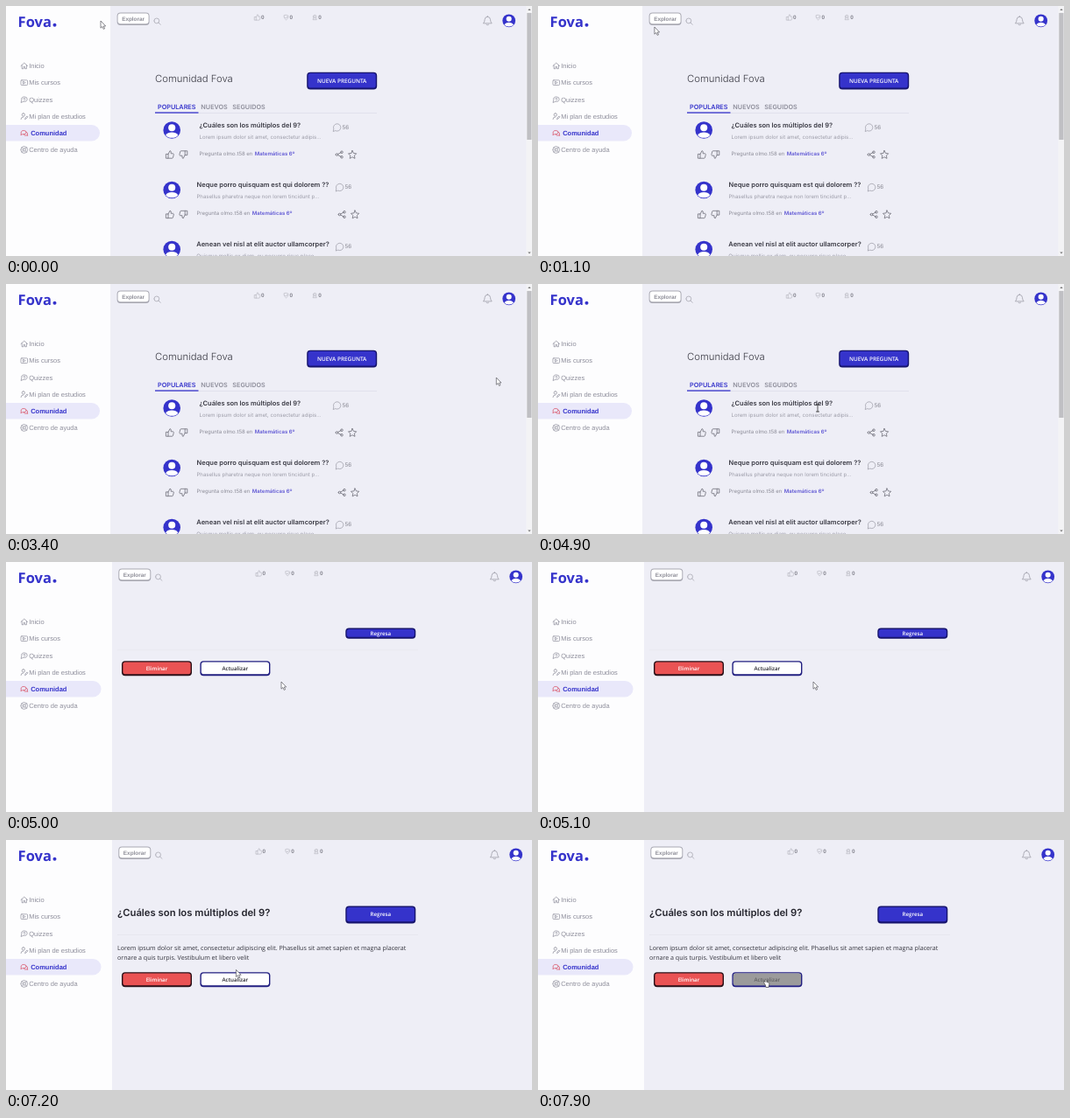
Animation of 600 by 286 pixels, one loop 8000 ms. Source, as an HTML page:

```html
<!DOCTYPE html>
<html lang="es">
<head>
<meta charset="utf-8">
<title>Comunidad</title>
<style>
  html, body { margin: 0; width: 100%; height: 100%; overflow: hidden; background: #eeeef6; }
  svg { display: block; width: 100vw; height: 100vh; }
  text { font-family: "Liberation Sans", Arial, sans-serif; white-space: pre; text-rendering: geometricPrecision; }
  .open { font-family: "Open Sans", sans-serif; }
  .inter { font-family: Inter, sans-serif; }
  .b { font-weight: 700; }
  .semi { font-weight: 600; }
  .light { font-weight: 300; }
  .line { fill: none; stroke-width: .75; stroke-linecap: round; stroke-linejoin: round; }
</style>
</head>
<body>
<svg id="stage" viewBox="0 0 600 286" xmlns="http://www.w3.org/2000/svg"></svg>
<script>
const BLUE = '#3533cb', NAVY = '#17156e', GREY = '#8e8e9b', INK = '#3a3a44';
const LOOP = 8000, STEP = 100, OPEN_AT = 5000, LOADED_AT = 5300, HOVER_AT = 7500;

// Outlines centred on 0,0
const ICONS = {
  home: 'M-4 0L0-3.6 4 0M-2.8-.8V3.4H-.8V1H.8V3.4H2.8V-.8',
  video: 'M-3-3H3Q4-3 4-2V2Q4 3 3 3H-3Q-4 3-4 2V-2Q-4-3-3-3ZM-1-1.4L1.5 0-1 1.4Z',
  quiz: 'M-3.8 3.4L-3.2.8Q-4-3 .3-3.2 4-3 3.6.3 3 3.2-.6 2.6ZM-1.2-1Q1.6-2.4 1.2-.2L0 .8',
  plan: 'M-1-3.6A1.8 1.8 0 1 1-1 0 1.8 1.8 0 1 1-1-3.6M-4 3.6Q-4 .8-1 .8M1 3.4L1.4 1.8 3.4-.2 4.4.8 2.4 2.8Z',
  chat: 'M-3.8 1.2Q-4.6-3-.6-3 2.6-3 2.4-.4 2 1.8-1.4 1.4L-3.8 2.2ZM2.6-1.2Q4.6-.4 3.8 1.8L4.2 3.2 2.4 2.8Q.4 3.6-.6 2',
  help: 'M-4 0A4 4 0 1 1 4 0 4 4 0 1 1-4 0M-1.7 0A1.7 1.7 0 1 1 1.7 0 1.7 1.7 0 1 1-1.7 0M-2.8-2.8L-1.2-1.2M2.8-2.8L1.2-1.2M-2.8 2.8L-1.2 1.2M2.8 2.8L1.2 1.2',
  search: 'M-3.8-.6A3.1 3.1 0 1 1 2.4-.6 3.1 3.1 0 1 1-3.8-.6M1.6 1.7L4 4',
  bell: 'M-4.6 2.6Q-3.2 1.4-3.2-1.6-3-4.6 0-4.6 3-4.6 3.2-1.6 3.2 1.4 4.6 2.6ZM0-4.6V-5.6M-1.4 4.2Q0 5.6 1.4 4.2',
  thumb: 'M-4.2-.6H-2V4.2H-4.2ZM-2-.4L0-4.4Q1.8-4.4 1.2-1.2H3.6Q4.6-1 4.2.6L3.4 3.6Q3.2 4.2 2.4 4.2H-2',
  shield: 'M0-3.6L3.4-2.4Q3.6 2 0 3.8-3.6 2-3.4-2.4ZM-1.4 0L-.2 1.2 1.6-1',
  medal: 'M-2.4-1.2A2.4 2.4 0 1 1 2.4-1.2 2.4 2.4 0 1 1-2.4-1.2M-2 1L-2.8 3.6H2.8L2 1M-1-1.2H1',
  bubble: 'M-4.4 4.4L-3.9 1.6A4.4 4.4 0 1 1-1.6 4Z',
  share: 'M-4.2 0A1.3 1.3 0 1 1-1.6 0 1.3 1.3 0 1 1-4.2 0M1.4-2.8A1.3 1.3 0 1 1 4-2.8 1.3 1.3 0 1 1 1.4-2.8M1.4 2.8A1.3 1.3 0 1 1 4 2.8 1.3 1.3 0 1 1 1.4 2.8M-1.7-.6L1.6-2.2M-1.7.6L1.6 2.2',
  star: 'M0-4.6L1.4-1.6 4.6-1.2 2.3 1.1 2.9 4.4 0 2.8-2.9 4.4-2.3 1.1-4.6-1.2-1.4-1.6Z'
};

const icon = (name, x, y, color = GREY, scale = 1, turn = 0) =>
  `<path class="line" d="${ICONS[name]}" stroke="${color}" transform="translate(${x} ${y}) rotate(${turn}) scale(${scale})"/>`;
const text = (x, y, size, fill, str, cls = '', anchor = 'start') =>
  `<text x="${x}" y="${y}" font-size="${size}" fill="${fill}" class="${cls}" text-anchor="${anchor}">${str}</text>`;
const rect = (x, y, w, h, fill, r = 0, extra = '') =>
  `<rect x="${x}" y="${y}" width="${w}" height="${h}" rx="${r}" fill="${fill}" ${extra}/>`;
const group = (id, body) => `<g id="${id}">${body}</g>`;

const button = (x, y, h, label, fill, edge, ink, size = 6.2) =>
  rect(x, y, 80, h, edge, 4) + rect(x + 1.4, y + 1.3, 77.2, h - 3.4, fill, 2.8) +
  text(x + 40, y + h / 2 + 1.9, size, ink, label, 'open semi', 'middle');

const avatar = (x, y, r) => `<g transform="translate(${x} ${y}) scale(${r / 10})">
  <circle r="10" fill="${BLUE}"/><circle cy="-2.8" r="4.1" fill="#fff"/>
  <path d="M-7.2 6Q-5 2.6 0 2.6T7.2 6Q4.6 9 0 9T-7.2 6Z" fill="#fff"/></g>`;

function frame(dx, side, pill, bell, user) {
  const nav = [['home', 'Inicio'], ['video', 'Mis cursos'], ['quiz', 'Quizzes'],
    ['plan', 'Mi plan de estudios'], ['chat', 'Comunidad'], ['help', 'Centro de ayuda']];
  const items = nav.map(([name, label], i) => {
    const y = 68.5 + i * 19.2, on = name === 'chat';
    return icon(name, 20.8, y, on ? '#d8485c' : GREY, .95) +
      text(on ? 28.2 : 26.2, y + 2.6, 7.5, on ? BLUE : GREY, label, on ? 'b' : '');
  }).join('');
  const stats = ['thumb', 'shield', 'medal'].map((name, i) => {
    const x = 286.8 + dx + i * 32.7;
    return icon(name, x, 13, '#adadb7', .75) + text(x + 4.1, 15.3, 6.4, '#85858f', '0', 'b');
  }).join('');
  return rect(0, 0, 600, 286, '#eeeef6') + rect(0, 0, side, 286, '#fdfdfe') +
    text(13.6, 23.8, 16.5, BLUE, 'Fova', 'open b') + `<circle cx="55.5" cy="21.8" r="2" fill="${BLUE}"/>` +
    rect(-12, 136, pill + 12, 18.5, '#e9e8fa', 9.2) + items +
    rect(126.6 + dx, 7.6, 37, 14.4, '#aaaab4', 4) + rect(127.6 + dx, 8.5, 35, 11.7, '#fff', 3) +
    text(145.1 + dx, 16.8, 6.4, '#8e8e98', 'Explorar', 'b', 'middle') +
    icon('search', 172.5 + dx, 17.5, '#a2a2ad', .95) + stats +
    icon('bell', bell, 17, '#9a9aa5') + avatar(user, 16.8, 7.4);
}

const POSTS = [
  { y: 136, x: 220.5, cx: 377.5, title: '¿Cuáles son los múltiplos del 9?', body: 'Lorem ipsum dolor sit amet, consectetur adipis...' },
  { y: 204.5, x: 217.5, cx: 380.5, title: 'Neque porro quisquam est qui dolorem ??', body: 'Phasellus pharetra neque non lorem tincidunt p...' },
  { y: 272.5, x: 217.3, cx: 380.5, title: 'Aenean vel nisl at elit auctor ullamcorper?', body: 'Quisque mollis ex diam, eu posuere risus place' }
];

const post = ({ y, x, cx, title, body }) =>
  avatar(189.2, y + 6, 9.8) + text(x, y + 2.8, 7.5, INK, title, 'inter semi') +
  text(x, y + 15.5, 6.05, '#9c9ca8', body, 'inter') +
  icon('bubble', cx, y + 3, '#9a9aa5', .95) + text(cx + 6, y + 4.6, 6.4, '#85858f', '56', 'inter') +
  icon('thumb', 187, y + 34, '#666671') + icon('thumb', 202.2, y + 34, '#666671', 1, 180) +
  text(x, y + 34.9, 6, '#8a8a96', 'Pregunta olmo.t58 en', 'inter') +
  text(x + 63.3, y + 34.9, 6, '#5f57d4', 'Matemáticas 6º', 'inter semi') +
  icon('share', cx + 2.8, y + 34, '#666671') + icon('star', cx + 17.6, y + 34, '#666671');

const tab = (x, label, color) => text(x, 117.7, 7.25, color, label, 'inter semi');

const listPage = frame(0, 119, 107, 549.3, 573.7) +
  text(170, 87.2, 11.3, INK, 'Comunidad Fova', 'inter light') +
  button(343.2, 75.8, 19.8, 'NUEVA PREGUNTA', BLUE, NAVY, '#fff', 6.4) +
  tab(173, 'POPULARES', BLUE) + tab(222.3, 'NUEVOS', GREY) + tab(258.3, 'SEGUIDOS', GREY) +
  rect(170, 122, 253, .7, '#dcdce8') + rect(170, 121.4, 49.5, 1.3, BLUE) +
  POSTS.map(post).join('') +
  rect(593.5, 0, 6.5, 286, '#f3f3f5') + rect(594.3, 8, 5.2, 145, '#bfbfc3') +
  '<path d="M595.3 5L597 3 598.7 5ZM595.3 281.5L597 283.5 598.7 281.5Z" fill="#777"/>';

const actions = y => button(132, y, 17, 'Eliminar', '#ea5354', '#2a1018', '#fff') +
  button(221.4, y, 17, 'Actualizar', '#fff', '#211e80', '#26262e');

const emptyDetail = button(387.3, 75.6, 12.2, 'Regresa', BLUE, NAVY, '#fff') +
  rect(127, 100.6, 343, .6, '#e3e3ec') + actions(113.3);

const fullDetail = button(387.3, 75.6, 19.8, 'Regresa', BLUE, NAVY, '#fff') +
  text(127, 87.3, 11.3, '#25252e', '¿Cuáles son los múltiplos del 9?', 'inter semi') +
  rect(127, 108.4, 343, .6, '#e3e3ec') +
  text(127, 125.5, 7.1, '#32323c', 'Lorem ipsum dolor sit amet, consectetur adipiscing elit. Phasellus sit amet sapien et magna placerat', 'open') +
  text(127, 136.7, 7.1, '#32323c', 'ornare a quis turpis. Vestibulum et libero velit', 'open') +
  actions(151.3) + rect(222.8, 152.6, 77.2, 13.6, '#777', 2.8, 'id="hover"');

const cursors =
  group('arrow', '<path d="M0 0V8.2L1.9 6.5 3.2 9.4 4.6 8.8 3.3 6H5.7Z" fill="#fff" stroke="#55555c" stroke-width=".7"/>') +
  group('beam', '<path class="line" d="M-1.6-4H1.6M0-4V4M-1.6 4H1.6" stroke="#222"/>') +
  group('hand', '<path d="M-.8 5L-2.2 3Q-2-.4-.9 2V-.4Q0-1.4.8-.4V2L3.4 2.7Q4 3 3.8 4.4L3 8H0Z" fill="#fff" stroke="#333" stroke-width=".6"/>');

document.getElementById('stage').innerHTML = group('list', listPage) +
  group('detail', frame(1.7, 121, 108.5, 557.3, 581.7) + group('empty', emptyDetail) + group('full', fullDetail)) + cursors;

// Pointer path: time, x, y
const PATH = [
  [900, 108, 17], [1600, 233.6, 52.3], [2200, 233.6, 52.3], [2800, 546, 113],
  [2900, 546, 113], [3200, 559.3, 107], [3400, 559.3, 107], [3600, 411, 126],
  [3700, 411, 126], [4600, 319, 142], [4900, 319, 142], [5000, 314, 137],
  [6500, 314, 137], [7400, 255, 150], [7600, 260, 160.5]
];
const ease = k => k * k * (3 - 2 * k);

function pointer(t) {
  const next = PATH.findIndex(p => p[0] > t);
  if (next < 0) return PATH[PATH.length - 1].slice(1);
  if (next === 0) return PATH[0].slice(1);
  const [t0, x0, y0] = PATH[next - 1], [t1, x1, y1] = PATH[next];
  const k = ease((t - t0) / (t1 - t0));
  return [x0 + (x1 - x0) * k, y0 + (y1 - y0) * k];
}

const el = id => document.getElementById(id);
const show = (id, on) => { el(id).style.display = on ? '' : 'none'; };

function render(now) {
  const t = Math.floor((now % LOOP) / STEP) * STEP;
  const opened = t >= OPEN_AT, loaded = t >= LOADED_AT, hovering = t >= HOVER_AT;
  show('list', !opened);
  show('detail', opened);
  show('empty', !loaded);
  show('full', loaded);
  el('hover').setAttribute('opacity', hovering ? Math.min(1, (t - HOVER_AT + STEP) / 200) * .73 : 0);

  const [x, y] = pointer(t);
  const overText = !opened && y > 130 && x < 340;
  const kind = hovering ? 'hand' : overText ? 'beam' : 'arrow';
  for (const id of ['arrow', 'beam', 'hand']) show(id, id === kind);
  el(kind).setAttribute('transform', `translate(${x} ${y})`);
}

function tick() {
  render(performance.now());
  requestAnimationFrame(tick);
}
tick();
</script>
</body>
</html>
```
